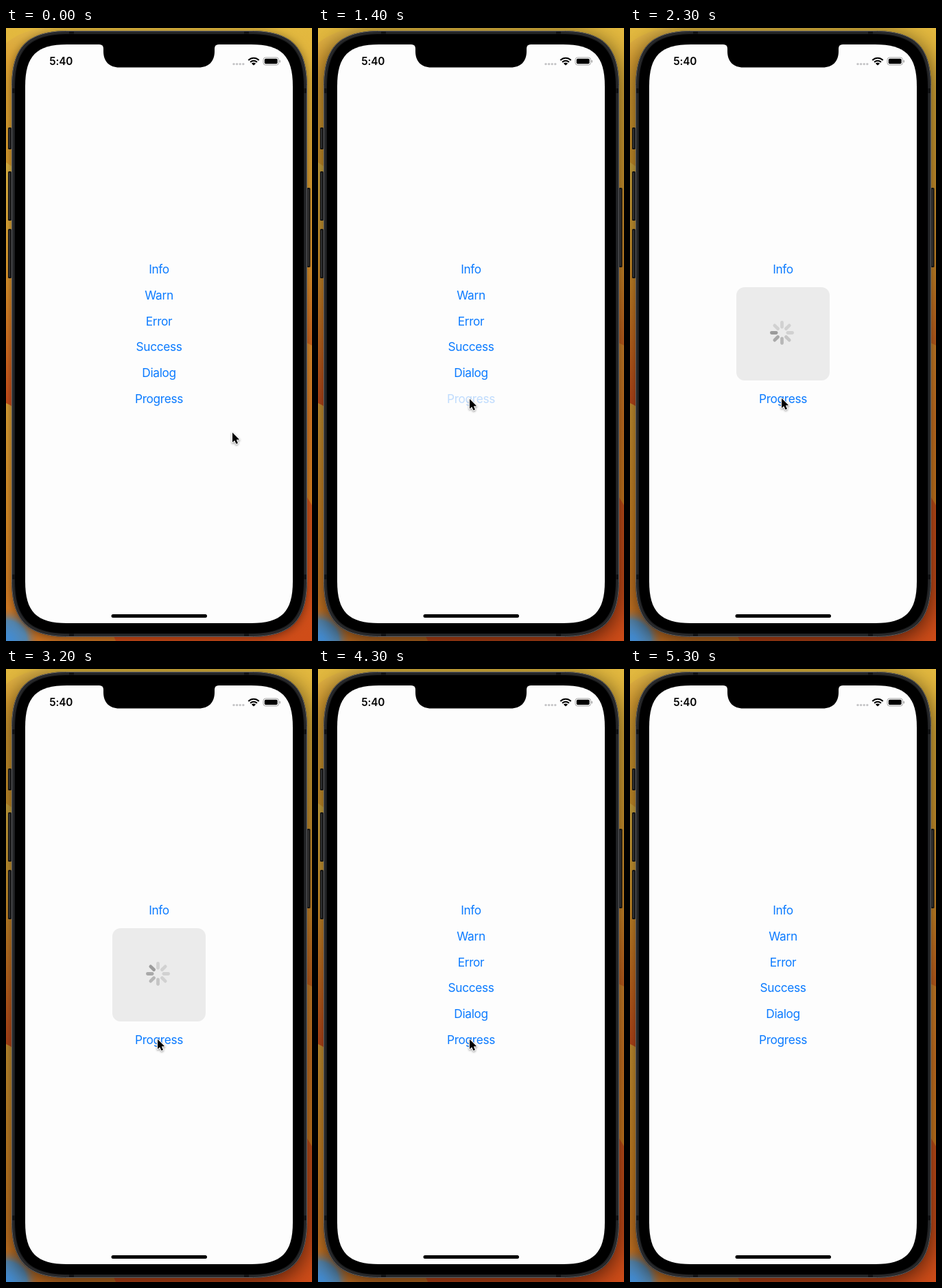
These frames come from a looping animation (446 by 894 pixels, 5400 ms). An HTML page with a canvas:

```html
<!DOCTYPE html>
<html lang="en">
<head>
<meta charset="utf-8">
<title>Phone progress demo</title>
<style>
html, body { margin: 0; width: 100%; height: 100%; overflow: hidden; background: #000; }
canvas { display: block; width: 446px; height: 894px; }
</style>
</head>
<body>
<canvas id="stage" width="446" height="894"></canvas>
<script>
const W = 446, H = 894, LOOP = 5400;
const ctx = document.getElementById('stage').getContext('2d');
const items = ['Info', 'Warn', 'Error', 'Success', 'Dialog', 'Progress'];

const clamp = v => Math.max(0, Math.min(1, v));
const ramp = (t, from, to) => clamp((t - from) / (to - from));
const ease = v => v * v * (3 - 2 * v);
const mix = (a, b, v) => a + (b - a) * v;

function gradient(x0, y0, x1, y1, stops) {
  const g = ctx.createLinearGradient(x0, y0, x1, y1);
  stops.forEach(([at, color]) => g.addColorStop(at, color));
  return g;
}

function fillRound(x, y, w, h, r, color) {
  ctx.fillStyle = color;
  ctx.beginPath();
  ctx.roundRect(x, y, w, h, r);
  ctx.fill();
}

// Rounded rectangle with continuous-curvature corners
function smoothRect(x, y, w, h, e) {
  const c = e * 0.27, r = x + w, b = y + h;
  ctx.beginPath();
  ctx.moveTo(x + e, y);
  ctx.lineTo(r - e, y);
  ctx.bezierCurveTo(r - c, y, r, y + c, r, y + e);
  ctx.lineTo(r, b - e);
  ctx.bezierCurveTo(r, b - c, r - c, b, r - e, b);
  ctx.lineTo(x + e, b);
  ctx.bezierCurveTo(x + c, b, x, b - c, x, b - e);
  ctx.lineTo(x, y + e);
  ctx.bezierCurveTo(x, y + c, x + c, y, x + e, y);
  ctx.closePath();
}

function wallpaper() {
  ctx.fillStyle = gradient(0, 0, 0, H, [
    [0, '#e3b93f'], [0.2, '#dda433'], [0.4, '#dc9029'], [0.55, '#cf5a1c'], [1, '#cf4c18']]);
  ctx.fillRect(0, 0, W, H);

  // Left edge bands
  ctx.fillStyle = gradient(0, 0, 0, 200, [[0, '#dfb548'], [0.25, '#dda233'], [1, '#d89a2c']]);
  ctx.beginPath();
  ctx.moveTo(0, 22);
  ctx.quadraticCurveTo(25, 2, 60, 0);
  ctx.lineTo(90, 90);
  ctx.lineTo(20, 210);
  ctx.lineTo(0, 196);
  ctx.fill();
  ctx.fillStyle = gradient(0, 196, 0, 560, [
    [0, '#dfb543'], [0.4, '#dc9b2d'], [0.75, '#d36c1f'], [1, '#c9481a']]);
  ctx.beginPath();
  ctx.moveTo(0, 196);
  ctx.lineTo(20, 210);
  ctx.lineTo(20, 570);
  ctx.lineTo(0, 570);
  ctx.fill();
  ctx.fillStyle = gradient(0, 547, 0, 890, [[0, '#dba035'], [0.5, '#d88a25'], [1, '#cc7323']]);
  ctx.beginPath();
  ctx.moveTo(0, 547);
  ctx.quadraticCurveTo(12, 551, 24, 570);
  ctx.lineTo(160, H);
  ctx.lineTo(0, H);
  ctx.fill();

  // Right edge bands
  ctx.fillStyle = gradient(0, 461, 0, 700, [[0, '#dd8b2a'], [0.45, '#dc7c24'], [1, '#d8821f']]);
  ctx.beginPath();
  ctx.moveTo(430, 455);
  ctx.lineTo(W, 463);
  ctx.lineTo(W, 696);
  ctx.lineTo(430, 670);
  ctx.fill();

  const blue = ctx.createRadialGradient(0, H, 8, 0, H, 48);
  blue.addColorStop(0, '#438bd0');
  blue.addColorStop(0.55, '#5685aa');
  blue.addColorStop(1, 'rgba(170,110,55,0)');
  ctx.fillStyle = blue;
  ctx.fillRect(0, H - 50, 60, 50);
}

function phoneBody(focus) {
  ctx.save();
  ctx.shadowColor = `rgba(0,0,0,${mix(0.45, 0.65, focus)})`;
  ctx.shadowBlur = mix(14, 32, focus);
  ctx.shadowOffsetY = mix(2, 6, focus);
  smoothRect(8, 4, 431, 884, 84);
  ctx.fillStyle = '#1d1e20';
  ctx.fill();
  ctx.restore();

  for (const [x, y, h] of [[3, 145, 32], [3, 209, 72], [3, 293, 72], [438.5, 233, 116]]) {
    fillRound(x, y, 5, h, 1.5, '#141414');
    fillRound(x + 1.5, y + 2, 1.5, h - 4, 0.5, '#363738');
  }

  smoothRect(8.5, 4.5, 430, 883, 83.5);
  ctx.lineWidth = 1;
  ctx.strokeStyle = '#606164';
  ctx.stroke();
  smoothRect(10.5, 6.5, 426, 879, 81.5);
  ctx.lineWidth = 2;
  ctx.strokeStyle = '#292a2c';
  ctx.stroke();
  smoothRect(13, 9, 421, 874, 79);
  ctx.fillStyle = '#000';
  ctx.fill();

  ctx.fillStyle = '#111214';
  for (const x of [92, 347]) for (const y of [5, 883]) ctx.fillRect(x, y, 7, 4);
  for (const x of [9, 434]) for (const y of [88, 797]) ctx.fillRect(x, y, 4, 7);

  smoothRect(28, 24, 390, 844, 61);
  ctx.fillStyle = '#fdfdfd';
  ctx.fill();
}

function notch() {
  ctx.fillStyle = '#000';
  ctx.beginPath();
  ctx.moveTo(136, 23);
  ctx.lineTo(310, 23);
  ctx.lineTo(310, 24);
  ctx.quadraticCurveTo(304, 24, 304, 30);
  ctx.lineTo(304, 34);
  ctx.bezierCurveTo(304, 49, 295, 57.5, 281, 57.5);
  ctx.lineTo(165, 57.5);
  ctx.bezierCurveTo(151, 57.5, 142, 49, 142, 34);
  ctx.lineTo(142, 30);
  ctx.quadraticCurveTo(142, 24, 136, 24);
  ctx.fill();
}

function label(text, x, y, font, color, spacing) {
  ctx.font = font + ' Inter, sans-serif';
  ctx.letterSpacing = spacing + 'px';
  ctx.textAlign = 'center';
  ctx.fillStyle = color;
  ctx.fillText(text, x + spacing / 2, y);
}

function statusBar() {
  label('5:40', 80.3, 54.3, '600 15.3px', '#000', -0.1);

  ctx.fillStyle = '#c4c4c6';
  for (let i = 0; i < 4; i++) {
    ctx.beginPath();
    ctx.arc(332 + i * 4.6, 52.6, 1.7, 0, 7);
    ctx.fill();
  }

  ctx.save();
  ctx.beginPath();
  ctx.moveTo(361, 54.7);
  ctx.lineTo(350, 43.7);
  ctx.lineTo(350, 38);
  ctx.lineTo(372, 38);
  ctx.lineTo(372, 43.7);
  ctx.clip();
  ctx.strokeStyle = ctx.fillStyle = '#000';
  ctx.lineWidth = 2.1;
  for (const r of [6.5, 10.5]) {
    ctx.beginPath();
    ctx.arc(361, 54.2, r, Math.PI, 2 * Math.PI);
    ctx.stroke();
  }
  ctx.beginPath();
  ctx.arc(361, 54.4, 3.8, Math.PI, 2 * Math.PI);
  ctx.fill();
  ctx.restore();

  ctx.strokeStyle = '#a3a3a3';
  ctx.lineWidth = 1;
  ctx.beginPath();
  ctx.roundRect(375, 43, 22.5, 11, 3.4);
  ctx.stroke();
  fillRound(376.8, 44.8, 18.9, 7.4, 1.8, '#000');
  fillRound(398.6, 46.8, 1.4, 3.6, 0.8, '#a3a3a3');
}

function menu(pressed) {
  items.forEach((text, i) => {
    ctx.globalAlpha = text === 'Progress' ? mix(1, 0.25, pressed) : 1;
    label(text, 223.2, 358.4 + i * 37.65, '400 17.3px', '#0a7aff', -0.35);
  });
  ctx.globalAlpha = 1;
}

function progressBox(t, alpha) {
  if (!alpha) return;
  ctx.save();
  ctx.globalAlpha = alpha;
  fillRound(155, 378, 136, 136, 12, '#ebebeb');
  ctx.translate(221.5, 444.5);
  const head = (Math.floor(t / 100) + 7) % 8;
  for (let i = 0; i < 8; i++) {
    const age = (head - i + 8) % 8;
    const grey = Math.round(Math.min(209, 155 + age * 14));
    ctx.save();
    ctx.rotate(i * Math.PI / 4);
    fillRound(-2.4, -17.5, 4.8, 11.5, 2.4, `rgb(${grey},${grey},${grey})`);
    ctx.restore();
  }
  ctx.restore();
}

function pointer(t) {
  const arrive = ease(ramp(t, 100, 800));
  const leave = ease(ramp(t, 4500, 5200));
  if (leave === 1) return;
  const x = mix(mix(330, 221, arrive), 470, leave);
  const y = mix(mix(590, 541, arrive) - ramp(t, 1500, 1700), 590, leave);
  ctx.save();
  ctx.translate(x, y);
  ctx.beginPath();
  ctx.moveTo(0, 0);
  for (const [px, py] of [[0, 14.3], [3.2, 11.4], [5.5, 16.6], [8, 15.5], [5.8, 10.4], [10.2, 10.2]])
    ctx.lineTo(px, py);
  ctx.closePath();
  ctx.lineJoin = 'round';
  ctx.lineWidth = 2;
  ctx.strokeStyle = '#fff';
  ctx.shadowColor = 'rgba(0,0,0,.45)';
  ctx.shadowBlur = 3;
  ctx.shadowOffsetY = 1.2;
  ctx.stroke();
  ctx.shadowColor = 'transparent';
  ctx.fillStyle = '#000';
  ctx.fill();
  ctx.restore();
}

function draw(t) {
  wallpaper();
  phoneBody(ramp(t, 1200, 1400));
  notch();
  statusBar();
  menu(ramp(t, 1250, 1400) - ramp(t, 1500, 1750));
  progressBox(t, ramp(t, 1550, 1700) - ramp(t, 4000, 4200));
  fillRound(153.5, 855, 139.5, 5, 2.5, '#000');
  pointer(t);
}

const start = performance.now();
function tick() {
  draw((performance.now() - start) % LOOP);
  requestAnimationFrame(tick);
}
tick();
</script>
</body>
</html>
```
